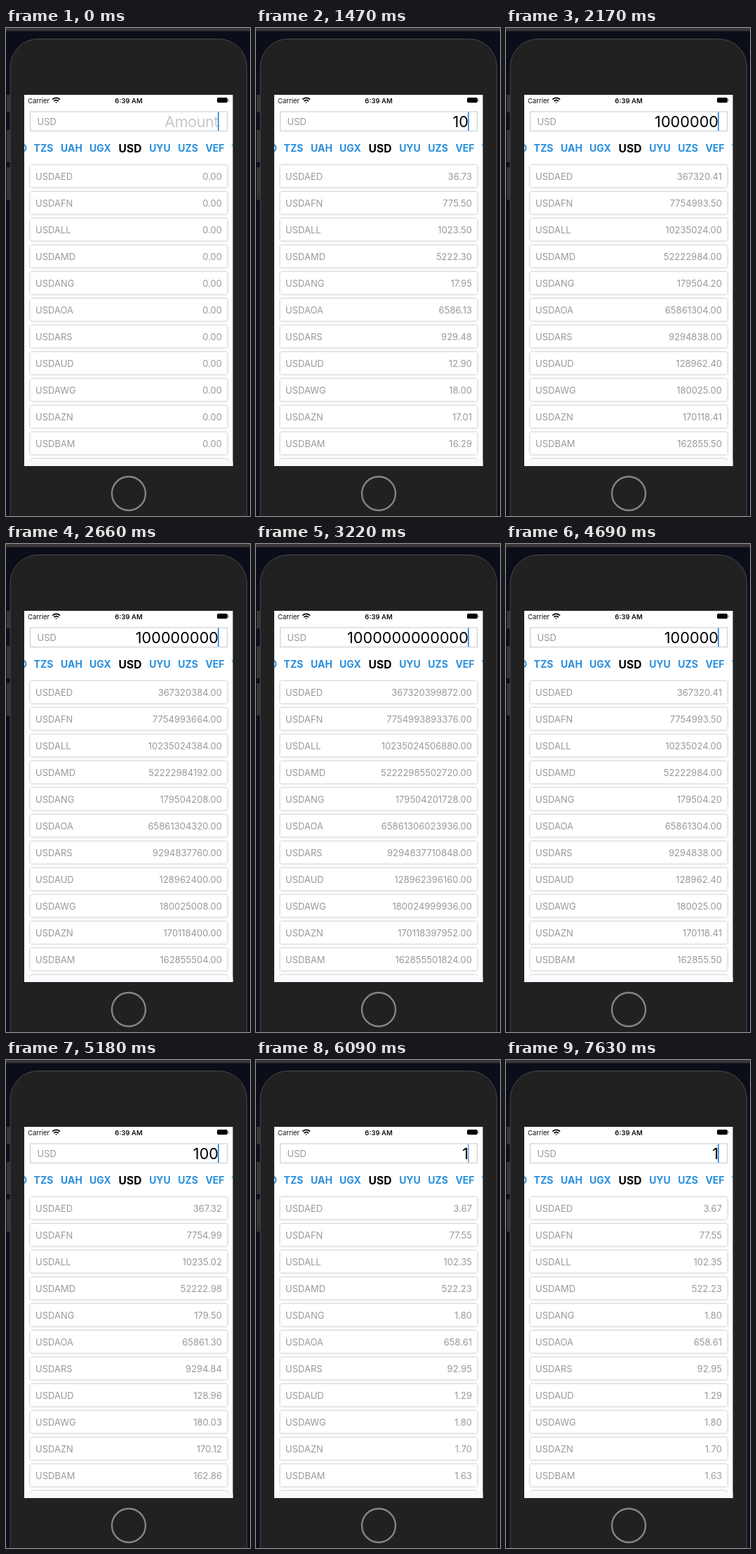
These frames come from a looping animation (348x694 px, 7700 ms). An HTML page:

```html
<!DOCTYPE html>
<html lang="en">
<head>
<meta charset="utf-8">
<title>Currency converter</title>
<style>
  html, body { margin: 0; width: 100%; height: 100%; overflow: hidden; background: #0b0e19; }
  svg { display: block; width: 100%; height: 100%; font-family: Inter, Roboto, sans-serif; }
  .row { font-size: 13px; fill: #999; }
  .card { fill: #fff; filter: drop-shadow(0 0 1.5px rgba(0, 0, 0, .36)); }
  .tab { font-size: 14px; font-weight: 700; fill: #2a8fdc; }
  .chosen { font-size: 15.6px; fill: #000; }
  .amount { font-size: 21.7px; }
  .empty { fill: #c7c7cb; letter-spacing: -.5px; }
  .mid { text-anchor: middle; }
  .end { text-anchor: end; }
  .status { font-size: 9.5px; fill: #111; }
</style>
</head>
<body>
<svg viewBox="0 0 348 694">
  <defs>
    <clipPath id="screen"><rect x="26" y="95" width="297.5" height="528"/></clipPath>
    <clipPath id="listArea"><rect x="26" y="185" width="297.5" height="431"/></clipPath>
  </defs>

  <!-- phone -->
  <rect width="348" height="694" fill="#0b0e19"/>
  <rect width="348" height="4.5" fill="#39363a"/>
  <g fill="#343438">
    <rect x="1" y="95" width="6" height="25"/>
    <rect x="1" y="145" width="6" height="46"/>
    <rect x="1" y="198" width="6" height="46"/>
  </g>
  <rect x="6" y="15.5" width="337.5" height="720" rx="40" fill="#212122" stroke="#48484a"/>
  <circle cx="175" cy="662" r="24" fill="none" stroke="#858585" stroke-width="2.4"/>
  <rect x="26" y="95" width="297.5" height="528" fill="#fff"/>
  <rect x="26" y="616" width="297.5" height="7" fill="#f8f9fc"/>

  <!-- status bar -->
  <text class="status" x="31" y="106.5">Carrier</text>
  <g fill="none" stroke="#000" stroke-width="1.7">
    <path d="M66.3 101.6q5.4-4.5 10.8 0M68.4 104q3.3-2.7 6.6 0"/>
    <path d="M70.2 105.4h3l-1.5 1.7z" fill="#000" stroke="none"/>
  </g>
  <text class="status mid" x="175" y="106.5" font-weight="600">6:39 AM</text>
  <rect x="301" y="99" width="15" height="7.2" rx="2" fill="#000"/>
  <rect x="316.7" y="101.2" width="1.2" height="2.8" rx=".6" fill="#777"/>

  <!-- input -->
  <rect x="34.5" y="119" width="281" height="27.5" fill="#fff" stroke="#c9c9c9"/>
  <text class="row" x="44.5" y="137.5">USD</text>
  <text class="end" id="amount" x="303" y="140.5"></text>
  <rect id="cursor" x="302" y="119.5" width="1.8" height="26.5" fill="#3d8bdc"/>

  <g id="tabs" clip-path="url(#screen)"></g>
  <g id="list" clip-path="url(#listArea)"></g>
</svg>
<script>
const LOOP = 7700, TICK = 70;
const rates = {
  AED: 3.67320398, AFN: 77.549937, ALL: 102.350241, AMD: 522.229859,
  ANG: 1.79504203, AOA: 658.61304, ARS: 92.94838, AUD: 1.28962399,
  AWG: 1.80025006, AZN: 1.701184, BAM: 1.628555
};
const tabs = {
  TWD: 13, TZS: 53.5, UAH: 93.5, UGX: 134.5, USD: 177,
  UYU: 219.5, UZS: 259.5, VEF: 298, VND: 337
};
const typed = [490, 1400, 1610, 1750, 1890, 2030, 2170, 2380, 2590, 2730, 2870, 3010, 3220];
const erased = [3640, 3780, 3990, 4200, 4340, 4480, 4620, 4760, 4970, 5110, 5320, 5460];

const byId = id => document.getElementById(id);

function add(parent, tag, attributes, text = "") {
  const node = document.createElementNS("http://www.w3.org/2000/svg", tag);
  for (const name in attributes) node.setAttribute(name, attributes[name]);
  node.textContent = text;
  return parent.appendChild(node);
}

for (const [code, x] of Object.entries(tabs)) {
  const chosen = code === "USD";
  add(byId("tabs"), "text", { class: "tab mid" + (chosen ? " chosen" : ""), x, y: chosen ? 176.5 : 176 }, code);
}

const addCard = i => add(byId("list"), "rect", { class: "card", x: 34.5, y: 195 + 38 * i, width: 281, height: 31.5, rx: 2.5 });

const rows = Object.entries(rates).map(([code, rate], i) => {
  addCard(i);
  const y = 215.7 + 38 * i;
  add(byId("list"), "text", { class: "row", x: 42, y }, "USD" + code);
  return { rate, value: add(byId("list"), "text", { class: "row end", x: 308, y }) };
});
addCard(rows.length);

const digitsAt = t => {
  const past = times => times.filter(time => time <= t).length;
  return past(typed) - past(erased);
};
const amountAt = t => digitsAt(t) ? "1".padEnd(digitsAt(t), "0") : "";

// The cursor stays solid while keys are pressed and blinks when idle.
function cursorOpacity(t) {
  const start = t < 490 ? 70 : t < 1400 ? 1120 : 6090;
  if (t < start || (t >= 1400 && t < 6090)) return 1;
  const phase = t < 490 ? Math.min(t - start, 280) : (t - start) % 1050;
  const fade = Math.max(1 - (phase + TICK) / 210, (phase - 280) / 210);
  return Math.min(1, Math.max(0, fade));
}

function draw(now) {
  const t = Math.floor(now % LOOP / TICK) * TICK;
  const amount = amountAt(t);
  byId("amount").textContent = amount || "Amount";
  byId("amount").setAttribute("class", "end amount" + (amount ? "" : " empty"));
  byId("cursor").setAttribute("opacity", cursorOpacity(t));

  // Converted values follow one tick later, in single precision.
  const base = Number(amountAt(t - TICK));
  for (const { rate, value } of rows) value.textContent = Math.fround(rate * base).toFixed(2);
}

const began = performance.now();
function loop() {
  draw(performance.now() - began);
  requestAnimationFrame(loop);
}
loop();
</script>
</body>
</html>
```
